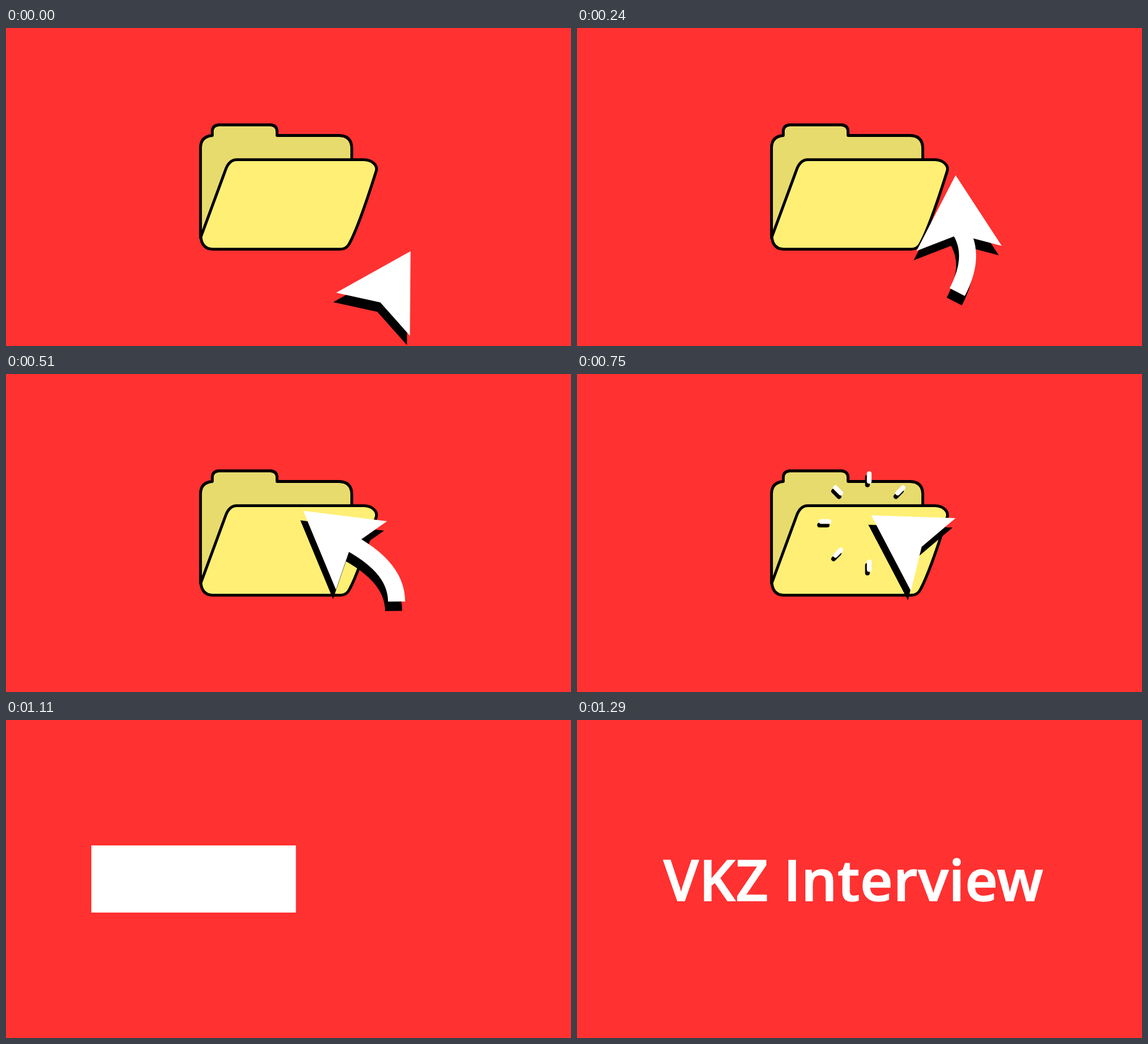
An HTML page that plays this animation: 960x540 px, repeating every 3690 ms.

```html
<!DOCTYPE html>
<html lang="en">
<head>
<meta charset="utf-8">
<title>Interview intro</title>
<style>
  html, body { margin: 0; width: 100%; height: 100%; overflow: hidden; background: #ff3131; }
  svg { display: block; width: 100vw; height: 100vh; color: #fff; }
  .outline { stroke: #000; stroke-width: 4.8; stroke-linejoin: round; }
  .shadow { color: #000; }
  #title { font: 600 96px "Open Sans", "Noto Sans", sans-serif; letter-spacing: 0.8px; fill: #fff; stroke: #fff; stroke-width: 1.6; }
</style>
</head>
<body>
<svg viewBox="0 0 960 540">
  <g id="scene">
    <path class="outline" fill="#e8db6d" d="M330.5 356V203Q331 184 350.5 182.5V175Q351 165 362 164.5H449Q460 165 460.5 175V182.5H566Q587 183 587.5 204V224L380 300Z"/>
    <path class="outline" fill="#ffef74" d="M392 223.7H608C622 224 632 233 629 243Q600 335 584 365Q579 375.7 568 375.7H351Q333 375 331 355L373 241Q379 224 392 223.7Z"/>
    <use class="shadow" href="#burst" transform="translate(-3 6)"/>
    <g id="burst" stroke="currentColor" stroke-width="8" stroke-linecap="round"></g>
    <use class="shadow" href="#cursor" transform="translate(-5 16)"/>
    <path id="track" fill="none" d="M636 466C676 389 667 343 585.6 293.5"/>
    <g id="cursor">
      <path id="tail" fill="none" stroke="currentColor" stroke-width="29" pathLength="1"
            d="M636 466C684 388 676 328 560 274"/>
      <path id="head" fill="currentColor" d="M-101 0L24 73L0 0L23 -72Z"/>
    </g>
  </g>
  <g id="title">
    <text x="147" y="307">VKZ</text>
    <text x="351" y="307">Interview</text>
  </g>
  <rect id="block" y="213" height="114" fill="#fff"/>
</svg>
<script>
  const LOOP = 3690, TICK = 30, POSE = 73.3;
  const LEFT = 145, WIDTH = 670;
  const FOLDER_END = 960, COVERED = 1140, WIPE = 180;
  const TURN_STEPS = 7.1, TAIL_STEPS = 10, BURST_STEP = 7;

  const $ = id => document.getElementById(id);
  const set = (el, attrs) => { for (const k in attrs) el.setAttribute(k, attrs[k]); };
  const show = (el, on) => set(el, { display: on ? "inline" : "none" });
  const clamp = v => Math.min(1, Math.max(0, v));

  const track = $("track"), trackLength = track.getTotalLength();

  for (let i = 0; i < 8; i++) {
    const ray = document.createElementNS("http://www.w3.org/2000/svg", "line");
    set(ray, { transform: `translate(496.5 250.5) rotate(${i * 45})` });
    $("burst").append(ray);
  }

  // The head runs along its track and turns; the tail grows behind it, then catches up.
  function drawCursor(step) {
    const reach = clamp(step * 0.195);
    const turn = (1 + Math.cos(Math.PI * clamp(step / TURN_STEPS))) / 2;
    const { x, y } = track.getPointAtLength(reach * trackLength);
    set($("head"), { transform: `translate(${x} ${y}) rotate(${32 + 88.6 * turn})` });

    const from = clamp(step / TAIL_STEPS) ** 2.08;
    show($("tail"), reach > from);
    set($("tail"), { "stroke-dasharray": `0 ${from} ${Math.max(0, reach - from)} 2` });
  }

  function drawBurst(step) {
    const age = step - BURST_STEP;
    show($("burst"), age >= 0);
    const outer = 85 - 29 * 0.5 ** age;
    for (const ray of $("burst").children) set(ray, { x1: outer - 13, x2: outer });
  }

  // The block grows from the left, then leaves to the right and uncovers the title.
  function drawBlock(t) {
    const grow = clamp((t - FOLDER_END) / WIPE) ** 3.6;
    const cut = 1 - (1 - clamp((t - COVERED) / (WIPE - TICK))) ** 3.6;
    set($("block"), { x: LEFT + WIDTH * cut, width: WIDTH * Math.max(0, grow - cut) });
  }

  function draw(now) {
    const t = Math.floor((now % LOOP) / TICK) * TICK;
    const step = Math.floor(t / POSE);
    show($("scene"), t < FOLDER_END);
    show($("title"), t >= COVERED);
    drawCursor(step);
    drawBurst(step);
    drawBlock(t);
  }

  function loop(now) {
    draw(now);
    requestAnimationFrame(loop);
  }
  draw(0);
  requestAnimationFrame(loop);
</script>
</body>
</html>
```
